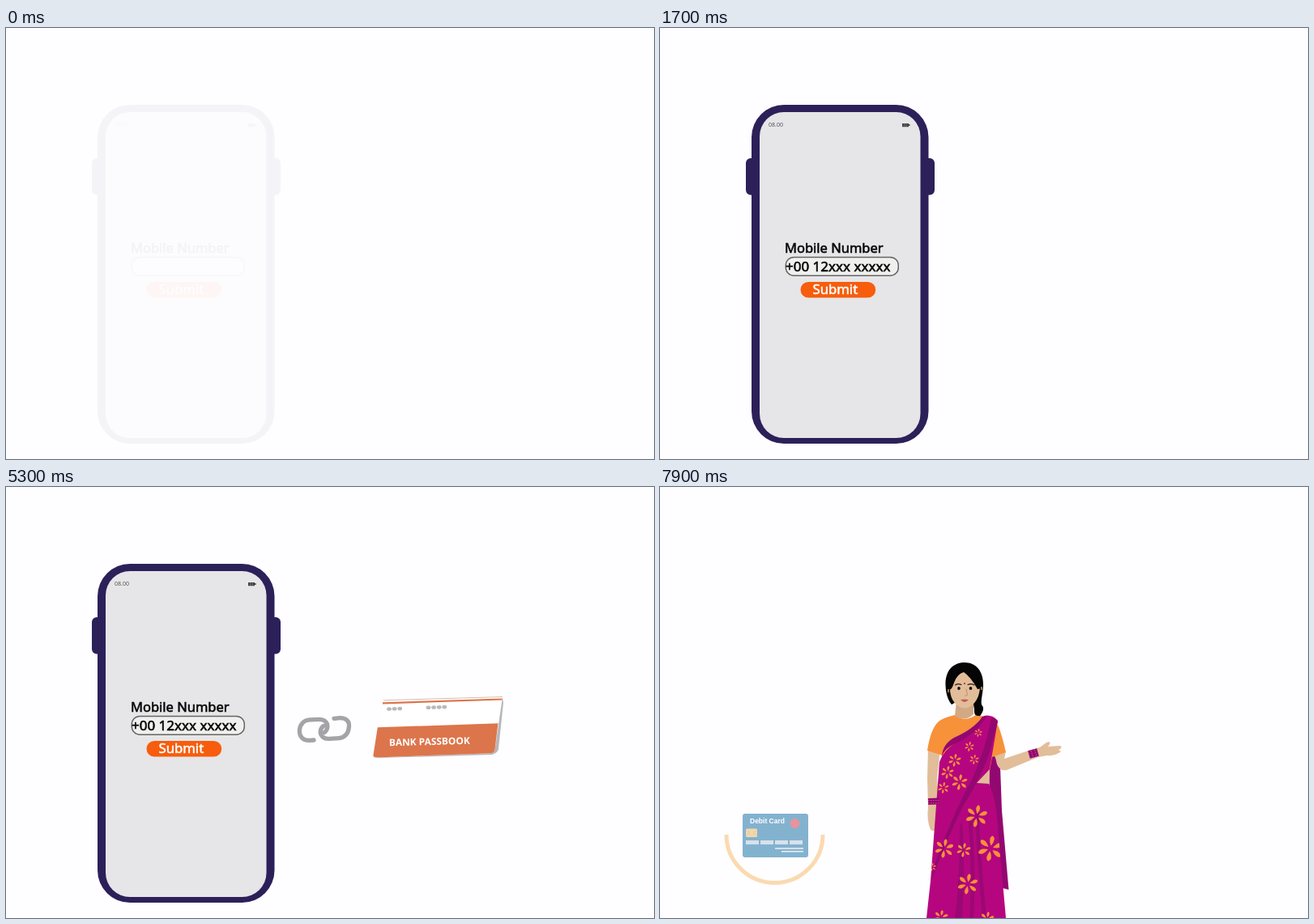
An HTML page that plays this animation: 800x533 px, repeating every 8 s.

```html
<!DOCTYPE html>
<html lang="en">
<head>
<meta charset="utf-8">
<title>Link mobile number</title>
<style>
  html, body { margin: 0; width: 100%; height: 100%; overflow: hidden; background: #fefdff; }
  svg { display: block; width: 800px; height: 533px; }
  text { font-family: "Noto Sans", "Open Sans", sans-serif; }
  .medium { stroke-width: .55; stroke: currentColor; fill: currentColor; }
  .skin { fill: #e2bd99; }
  .sari { fill: #b5067f; }
  .fold { fill: #930870; }
  .blouse { fill: #f7913a; }
</style>
</head>
<body>
<svg viewBox="0 0 800 533">
  <defs>
    <g id="flower" fill="#f7913a"></g>
    <clipPath id="drape">
      <path d="M400 283Q410 281 417 289L407 349L391 366L406 367Q415 385 417 420L427 533H329L334 487L345 340Q350 325 367 315Q386 303 400 283Z"/>
    </clipPath>
  </defs>

  <g id="linking">
    <g id="phone">
      <rect x="106" y="161" width="233" height="45.500" rx="6" fill="#2c2059"/>
      <rect x="113" y="95" width="218.500" height="419" rx="40" fill="#2c2059"/>
      <rect x="123" y="104" width="198.500" height="403" rx="30" fill="#e6e5e8"/>
      <text x="134" y="122.300" font-size="7" fill="#555">08.00</text>
      <path d="M299 118h8v1h1.500v2H307v1.200h-8z" fill="#444"/>
      <path d="M301.500 118.500v3M304 118.500v3" stroke="#aaa" stroke-width=".5"/>
      <text class="medium" x="154" y="278" font-size="16.500" color="#060606">Mobile Number</text>
      <rect x="155.300" y="283.400" width="139" height="22.800" rx="10" fill="#f0f0ef" stroke="#666" stroke-width="1.500"/>
      <rect x="173.500" y="314" width="92.700" height="19.600" rx="9.800" fill="#f75d0c"/>
      <text class="medium" x="188.500" y="329" font-size="16.700" color="#fff">Submit</text>
    </g>
    <text id="number" class="medium" x="155" y="301.300" font-size="17" color="#060606">+00 12xxx xxxxx</text>

    <g id="chain" fill="none" stroke="#a4a3a7" stroke-width="5.300" stroke-linecap="round">
      <path d="M380 313L375 313.400C366 313.800 362 308 362.400 301C363 293 368 288.300 375 287.900L386 287.300C394 287 397.500 292 396.800 297.500Q396 301.500 393 303.500"/>
      <path d="M405 286.300L412 285.700C420 285.300 424 290 423.500 296C423 305 418 310 411 310.600L399 311.400C391.500 311.800 387.500 307 388.300 301.500Q389 297.500 392 295.500"/>
    </g>

    <g id="passbook">
      <path d="M613 260L614 267L608 324Q607 329 600 331L460 335L453 333L590 325Z" fill="#b9b6b8"/>
      <path d="M466 264L613 259.500L603.500 325Q602.500 329 598 329.300L457 334.500Q453 334.500 453.500 331Z" fill="#fff"/>
      <path d="M458.800 297.300L607.500 292.300L603.500 325Q602.500 329 598 329.300L457 334.500Q453 334.500 453.500 331Z" fill="#dc754b"/>
      <path d="M466 263.800L613 259.500" stroke="#c9a08e" stroke-width=".7"/>
      <path d="M465 267.300L612.500 262.500" stroke="#dc754b" stroke-width="2.200"/>
      <g id="dots" fill="#b9b8bc"></g>
      <text transform="translate(473 320.300) rotate(-1.500)" font-size="11.900" font-weight="700" fill="#fff">BANK PASSBOOK</text>
    </g>
  </g>

  <g id="presenter">
    <path class="fold" d="M406 320L420 345L422 400L430.500 498L423 496L407 400Z"/>
    <path class="skin" d="M331 324H346L342 360L344 386L343 396L348 407L346 420Q342 428 334 424Q329 412 331 396L330 360Z"/>
    <path class="skin" d="M411 321L427 327L425 336L458 325L469 322L477 316Q483 314 481 318L479 321L494 320Q498 322 492 325L495 327Q488 333 478 332L467 334L428 350Q420 352 416 343Z"/>
    <path class="blouse" d="M364 282Q377 292 391 281L413 288Q419 293 427 328L410 334L407 351L376 350L346 331L330 326Q334 299 344 290Q350 285 364 282Z"/>
    <path class="skin" d="M390 351L407 350L406 368H388Z"/>
    <path class="sari" d="M400 283Q410 281 417 289L407 349L391 366L406 367Q415 385 417 420L427 533H329L334 487L345 340Q350 325 367 315Q386 303 400 283Z"/>
    <path class="fold" d="M398 284L404 283Q390 306 365 317Q351 323 348 333Q349 318 363 310Q388 299 398 284Z"/>
    <path class="fold" d="M409 286Q414 285 417 290L407 328Q398 356 374 395Q353 438 335 487L338 470Q360 407 386 360Q402 324 409 286Z"/>
    <path d="M370 420Q370 490 364 533H373Q377 480 373 413ZM380 405Q386 470 382 533H387Q391 470 384 400ZM389 400Q391 455 398 533H403Q396 464 393 394Z" class="fold" opacity=".75"/>
    <g id="flowers" clip-path="url(#drape)"></g>
    <g fill="none" stroke="#930870" stroke-width="8">
      <path d="M331 389L345 388.500"/>
      <path d="M457 325L464 334" stroke="none"/>
      <path d="M455.500 331L466.500 328"  stroke-width="10"/>
    </g>
    <g fill="none" stroke="#e55b9f" stroke-width=".8" stroke-dasharray="1.500 1.500">
      <path d="M331 387.500H345M331 391H345M458 326L461 335M462.500 325L465 333"/>
    </g>

    <path d="M376 217C391 217 400 229 399 247C398 258 396 264 397 269Q402 275 395 283Q387 284 388 275L385 255L360 269Q353 261 352.500 245C352 228 361 217 376 217Z" fill="#050505"/>
    <path fill="#d3a985" d="M366 264H387V281Q377 291 364 283Z"/>
    <path class="skin" d="M373 229Q360 236 358 249Q358 263 367 270Q376 277 385 270Q394 263 395 248Q389 243 377 229Z"/>
    <path d="M375 221Q359 224 355 248Q359 255 363 242Q367 231 375 229Q383 234 392 250Q398 250 397 242Q392 224 375 221Z" fill="#050505"/>
    <g fill="none" stroke="#23171a" stroke-width="1.100" stroke-linecap="round">
      <path d="M364.500 245Q368 242.500 372 244.500M380 244.500Q384 242.500 388 245"/>
      <path d="M378 250L379.500 257L376.500 258.500" stroke="#b18265" stroke-width=".8"/>
    </g>
    <circle cx="369" cy="249" r="1.900" fill="#171014"/>
    <circle cx="383.500" cy="249" r="1.900" fill="#171014"/>
    <circle cx="376" cy="243" r="1" fill="#b51c35"/>
    <path d="M371 263Q376 262 381 263Q376 269 371 263Z" fill="#c25c54"/>
    <path d="M356 250v4M397 247v4" stroke="#e8b05c" stroke-width="1.300"/>
  </g>

  <g id="card">
    <path d="M82 430A59.500 59.500 0 0 0 201 430" fill="none" stroke="#f7b965" stroke-width="5"/>
    <rect x="102" y="404" width="81" height="54" rx="3" fill="#0d6ba1"/>
    <text x="111" y="416" font-size="8.500" font-weight="700" fill="#fff" style="font-family:'Liberation Sans',sans-serif">Debit Card</text>
    <circle cx="166.500" cy="416" r="6" fill="#d0303f"/>
    <rect x="106" y="422.500" width="14" height="10.500" rx="1.500" fill="#ebb35d"/>
    <path d="M106 426h4v4h-4M120 426h-4v4h4" fill="none" stroke="#c58b42" stroke-width=".6"/>
    <path d="M106 439.500h70" stroke="#b5c7d8" stroke-width="5" stroke-dasharray="16 2"/>
    <path d="M142 447h35M150 450.700h27" stroke="#dce6ee" stroke-width="1.500"/>
  </g>
</svg>
<script>
  const LOOP = 8000, STEP = 100, CUT = 7700;
  const $ = id => document.getElementById(id);
  const add = (parent, tag, attrs) => {
    const el = document.createElementNS("http://www.w3.org/2000/svg", tag);
    for (const key in attrs) el.setAttribute(key, attrs[key]);
    return parent.appendChild(el);
  };

  for (let i = 0; i < 6; i++)
    add($("flower"), "path", { d: "M0 -2Q-3.500 -8 0 -10Q3.500 -8 0 -2Z", transform: `rotate(${i * 60 + 10})` });

  // x, y, size
  const blooms = [
    [393, 304, .5], [382, 321, .6], [364, 338, .8], [388, 337, .6], [355, 353, .8],
    [370, 365, 1], [350, 372, .7], [391, 407, 1.4], [408, 447, 1.6], [351, 447, 1.2],
    [375, 449, .9], [380, 491, 1.3], [347, 532, .9], [404, 534, .9], [336, 470, .5]
  ];
  for (const [x, y, size] of blooms)
    add($("flowers"), "use", { href: "#flower", transform: `translate(${x} ${y}) scale(${size})` });

  for (const [x, count] of [[473, 3], [521.5, 4]])
    for (let i = 0; i < count; i++)
      add($("dots"), "ellipse", { cx: x + i * 6.600, cy: 274.500 - (x - 473 + i * 6.600) * .035, rx: 2.900, ry: 2.300 });

  const starts = { phone: 0, number: 1000, chain: 2400, passbook: 3000, card: 7600 };
  const fade = dt => dt < 0 ? 0 : Math.min(1, .04 + dt * .00155);

  function draw(now) {
    const t = Math.floor(now % LOOP / STEP) * STEP;
    const cut = t >= CUT;
    $("linking").style.display = cut ? "none" : "";
    $("presenter").style.display = $("card").style.display = cut ? "" : "none";
    for (const id in starts) $(id).style.opacity = fade(t - starts[id]);
  }

  const origin = performance.now();
  function tick() {
    draw(performance.now() - origin);
    requestAnimationFrame(tick);
  }
  tick();
</script>
</body>
</html>
```
